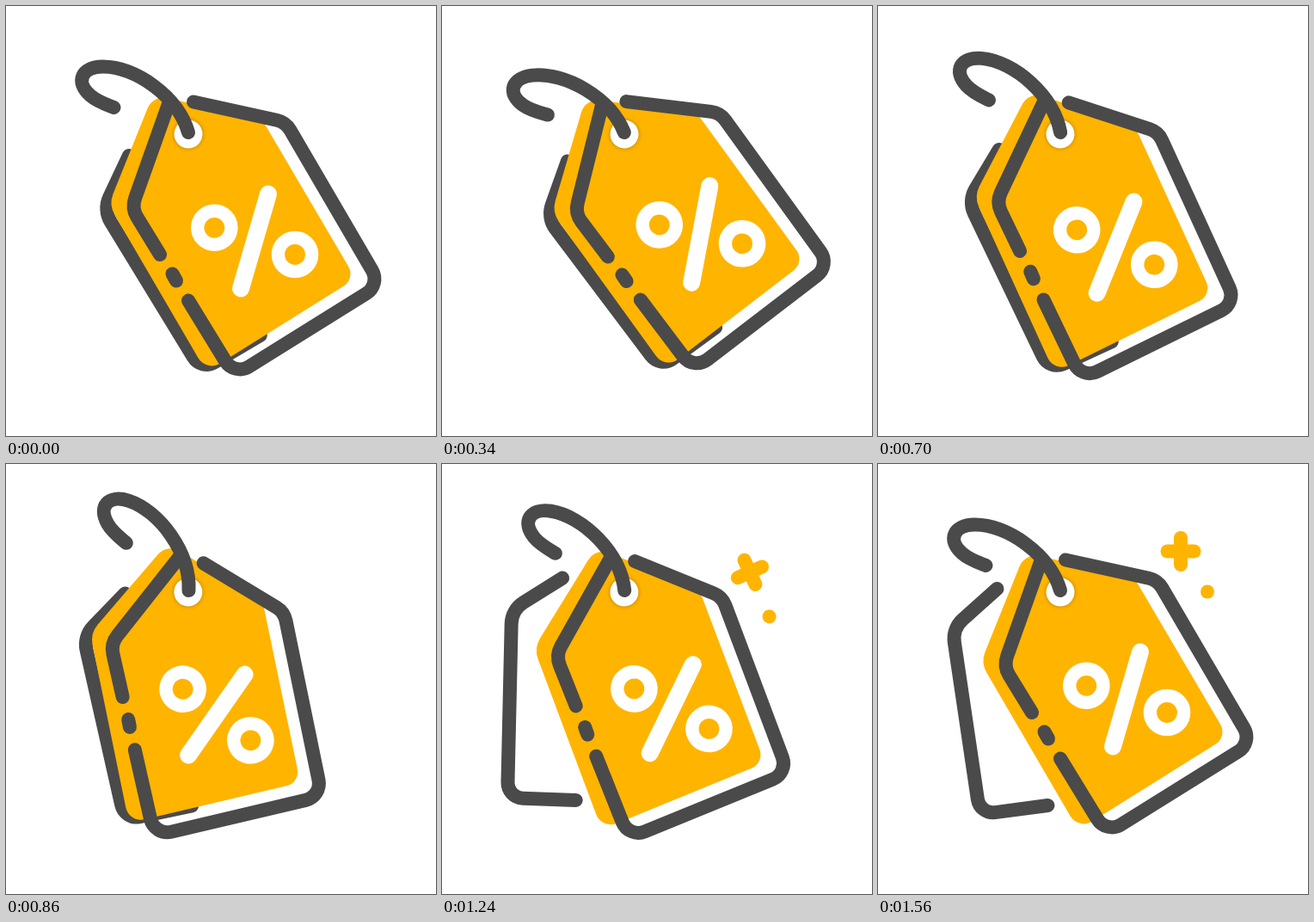
Recreate the animation shown at these times as an HTML page with a canvas. Size 500 by 500 pixels, loop 3.6 s.

```html
<!DOCTYPE html>
<html lang="en">
<head>
<meta charset="utf-8">
<title>Discount tag</title>
<style>
  html, body { margin: 0; width: 100%; height: 100%; overflow: hidden; background: #fff; }
  canvas { display: block; width: 100vw; height: 100vh; }
</style>
</head>
<body>
<canvas id="stage"></canvas>
<script>
const LOOP = 3600, STEP = 20, SIZE = 500;
const YELLOW = '#ffb400', DARK = '#4a4a4a', WHITE = '#fff';
const HOLE = [212, 148.5], OPEN = 23;
const canvas = document.getElementById('stage');
const dpr = window.devicePixelRatio || 1;
canvas.width = canvas.height = SIZE * dpr;
const ctx = canvas.getContext('2d');

// Each track is a list of [time, value].
const SWING = [[0, 0], [430, -6], [480, -6], [942, 20], [1530, 0]];
const FAN = [[962, 0], [1210, OPEN]];
const POP = [[900, 1], [1158, 0]];
const SPIN = [[1010, 0], [1420, 90]];

// Symmetric ease, the same as cubic-bezier(.5, 0, .5, 1).
function ease(x) {
  let lo = 0, hi = 1;
  for (let i = 0; i < 24; i++) {
    const s = (lo + hi) / 2;
    const at = 1.5 * s * (1 - s) + s * s * s;
    if (at < x) lo = s; else hi = s;
  }
  return lo * lo * (3 - 2 * lo);
}

function valueAt(track, t) {
  if (t <= track[0][0]) return track[0][1];
  for (let i = 1; i < track.length; i++) {
    const [t0, a] = track[i - 1], [t1, b] = track[i];
    if (t < t1) return a + (b - a) * ease((t - t0) / (t1 - t0));
  }
  return track[track.length - 1][1];
}

function turn(deg, [x, y]) {
  ctx.translate(x, y);
  ctx.rotate(deg * Math.PI / 180);
  ctx.translate(-x, -y);
}

function stroke(color, width) {
  ctx.strokeStyle = color;
  ctx.lineWidth = width;
  ctx.stroke();
}

// Path through rounded corners; each inner point is [x, y, radius].
function trace(points) {
  ctx.beginPath();
  ctx.moveTo(points[0][0], points[0][1]);
  for (let i = 1; i < points.length - 1; i++) {
    const [x, y, r] = points[i], [nx, ny] = points[i + 1];
    ctx.arcTo(x, y, nx, ny, r);
  }
  const [x, y] = points[points.length - 1];
  ctx.lineTo(x, y);
}

function line(points, color = DARK, width = 16) {
  trace(points);
  stroke(color, width);
}

function disc(x, y, r, color) {
  ctx.beginPath();
  ctx.arc(x, y, r, 0, Math.PI * 2);
  ctx.fillStyle = color;
  ctx.fill();
}

function ring(x, y) {
  ctx.beginPath();
  ctx.arc(x, y, 19.6, 0, Math.PI * 2);
  stroke(WHITE, 15.4);
}

function sparks(t) {
  if (t < POP[0][0]) return;
  const away = valueAt(POP, t);
  ctx.save();
  ctx.translate(-66 * away, 110 * away);
  disc(383, 148.5, 8, YELLOW);
  turn(valueAt(SPIN, t), [352, 101.5]);
  line([[336.5, 101.5], [367.5, 101.5]], YELLOW);
  line([[352, 86], [352, 117]], YELLOW);
  ctx.restore();
}

function backPanel(t) {
  ctx.save();
  turn(valueAt(FAN, t) - OPEN, HOLE);
  line([[138.5, 145], [86.5, 191.5, 30], [118.5, 407.5, 18], [197.5, 397]]);
  ctx.restore();
}

function body() {
  const top = [235, 118];
  trace([top, [299, 134, 17], [406.5, 317, 17], [233, 425.5, 18], [119.5, 231, 28], [171, 103, 20], top]);
  ctx.fillStyle = YELLOW;
  ctx.fill();
}

function eyelet() {
  ctx.save();
  ctx.shadowColor = 'rgba(0, 0, 0, .3)';
  ctx.shadowBlur = 5 * dpr;
  disc(212, 149, 16.5, WHITE);
  ctx.restore();
}

function cord() {
  ctx.beginPath();
  ctx.moveTo(212, 147);
  ctx.bezierCurveTo(200, 105, 150, 70, 112, 70.5);
  ctx.bezierCurveTo(88, 71, 80, 88, 98, 104);
  ctx.bezierCurveTo(106, 111, 115, 114, 125.5, 118);
  stroke(DARK, 16);
}

function tag() {
  body();
  ring(242.3, 257.8);
  ring(336, 289);
  line([[305, 218.5], [273, 328.5]], WHITE, 20);
  line([[218, 111.5], [325, 135, 24], [435.5, 324, 20], [265.5, 430, 20], [212, 342.5]]);
  line([[193.5, 311.5], [198, 319.5]]);
  line([[179, 289], [146, 235, 26], [189, 114]]);
  eyelet();
  cord();
}

function draw(t) {
  ctx.setTransform(dpr, 0, 0, dpr, 0, 0);
  ctx.fillStyle = WHITE;
  ctx.fillRect(0, 0, SIZE, SIZE);
  ctx.lineCap = ctx.lineJoin = 'round';
  turn(valueAt(SWING, t), HOLE);
  sparks(t);
  backPanel(t);
  tag();
}

const start = performance.now();
function tick() {
  const t = (performance.now() - start) % LOOP;
  draw(Math.floor(t / STEP) * STEP);
  requestAnimationFrame(tick);
}
tick();
</script>
</body>
</html>
```
